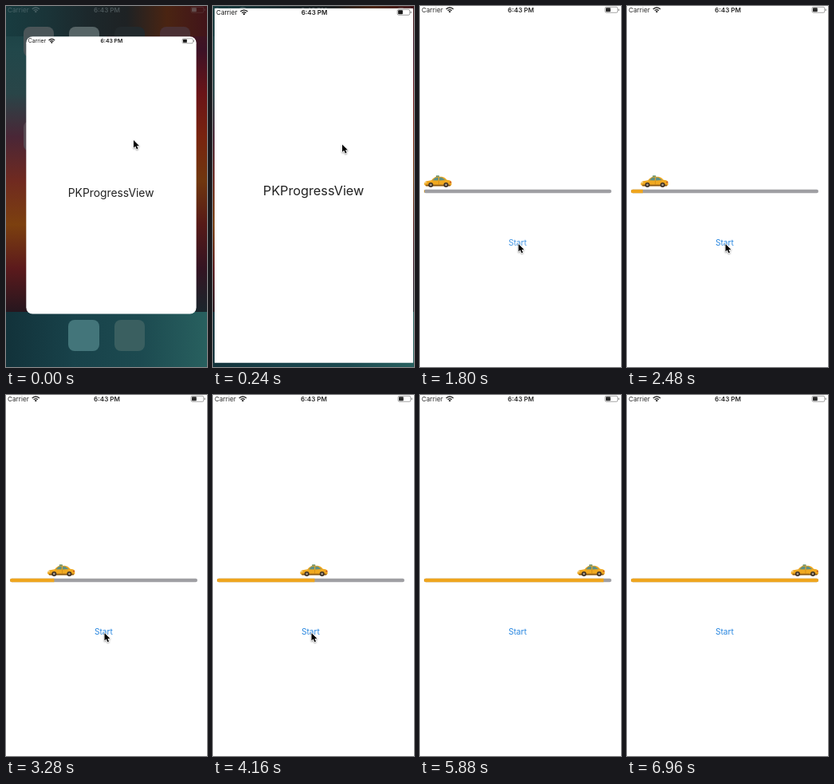
An HTML page with a canvas that plays this animation: 252 by 452 pixels, repeating every 7 s.

```html
<!DOCTYPE html>
<html lang="en">
<head>
<meta charset="utf-8">
<title>Progress view</title>
<style>
html, body { margin: 0; width: 100%; height: 100%; overflow: hidden; background: #fff; }
canvas { display: block; width: 252px; height: 452px; }
</style>
</head>
<body>
<canvas id="stage"></canvas>
<script>
const W = 252, H = 452, LOOP = 7000;
const canvas = document.getElementById('stage');
const ctx = canvas.getContext('2d');
const dpr = window.devicePixelRatio || 1;
canvas.width = W * dpr;
canvas.height = H * dpr;

const FONT = 'Inter, "Liberation Sans", sans-serif';
const clamp = v => Math.max(0, Math.min(1, v));
const lerp = (a, b, k) => a + (b - a) * k;
const span = (t, from, to) => clamp((t - from) / (to - from));

// cubic-bezier(.42, 0, .58, 1)
function easeInOut(x) {
  if (x <= 0 || x >= 1) return clamp(x);
  let lo = 0, hi = 1, s = x;
  for (let i = 0; i < 24; i++) {
    s = (lo + hi) / 2;
    const bx = 3 * (1 - s) * (1 - s) * s * 0.42 + 3 * (1 - s) * s * s * 0.58 + s * s * s;
    if (bx < x) lo = s; else hi = s;
  }
  return s * s * (3 - 2 * s);
}

function text(str, x, y, size, color, weight = 400, align = 'center') {
  ctx.font = `${weight} ${size}px ${FONT}`;
  ctx.textAlign = align;
  ctx.textBaseline = 'alphabetic';
  ctx.fillStyle = color;
  ctx.fillText(str, x, y);
}

function box(x, y, w, h, r, color) {
  ctx.beginPath();
  ctx.roundRect(x, y, w, h, r);
  ctx.fillStyle = color;
  ctx.fill();
}

function poly(points, color) {
  ctx.beginPath();
  points.forEach(([x, y]) => ctx.lineTo(x, y));
  ctx.closePath();
  ctx.fillStyle = color;
  ctx.fill();
}

function disc(x, y, r, color) {
  ctx.beginPath();
  ctx.arc(x, y, r, 0, Math.PI * 2);
  ctx.fillStyle = color;
  ctx.fill();
}

function statusBar(color) {
  text('Carrier', 2, 7.7, 8.2, color, 400, 'left');
  text('6:43 PM', 126.5, 7.7, 8.1, color, 600);

  ctx.strokeStyle = color;
  ctx.lineWidth = 1.4;
  for (const r of [3.4, 6]) {
    ctx.beginPath();
    ctx.arc(37.3, 8, r, -Math.PI * 0.77, -Math.PI * 0.23);
    ctx.stroke();
  }
  disc(37.3, 7.1, 1.2, color);

  ctx.lineWidth = 0.7;
  ctx.globalAlpha *= 0.6;
  ctx.beginPath();
  ctx.roundRect(232, 1.3, 15.8, 7, 1.7);
  ctx.stroke();
  box(248.6, 3.5, 1.1, 2.6, 0.5, color);
  ctx.globalAlpha /= 0.6;
  box(233, 2.3, 5.8, 5, 0.8, color);
}

function gradientRect(x, y, w, h, vertical, colors) {
  const g = ctx.createLinearGradient(x, y, vertical ? x : x + w, vertical ? y + h : y);
  colors.forEach((color, i) => g.addColorStop(i / (colors.length - 1), color));
  ctx.fillStyle = g;
  ctx.fillRect(x, y, w, h);
}

function homeScreen() {
  gradientRect(0, 0, 126, 383, true,
    ['#183c40', '#21474a', '#294548', '#4a2636', '#702a20', '#7c400f', '#5c1a1c', '#26161e']);
  gradientRect(126, 0, 126, 383, true,
    ['#481818', '#3c1226', '#6a1418', '#78240f', '#70370f', '#561a18', '#341422', '#1a262c']);
  gradientRect(0, 0, W, 38, false, ['#183c40', '#1a3438', '#1c282c', '#1e2224', '#4a2412', '#42141a']);
  gradientRect(0, 383, W, H - 383, false, ['#12323a', '#18424a', '#1c4a50', '#28605f']);

  ['#4a5558', '#566466', '#22292c', '#4a3034'].forEach((c, i) => box(22 + 57 * i, 26, 38, 38, 8, c));
  box(22, 144, 38, 38, 8, '#584a52');
  box(78, 393, 39, 39, 8, '#43757a');
  box(136, 393, 38, 39, 8, '#3a5f60');
  statusBar('rgba(150,165,168,.38)');
}

function launch(t) {
  const k = 1 - Math.pow(1 - span(t, 0, 420), 3);
  const x = lerp(25.5, 0, k), y = lerp(38.5, 0, k);
  const w = lerp(213, W, k), h = lerp(346.5, H, k);
  const scale = lerp(0.84, 1, k);
  box(x, y, w, h, lerp(8, 0, k), '#fff');
  ctx.save();
  ctx.translate(x + w / 2, lerp(40, 0, k));
  ctx.scale(scale, scale);
  ctx.translate(-W / 2, 0);
  statusBar('#1a1a1a');
  text('PKProgressView', 125.6, 237, 16.45, '#222');
  ctx.restore();
}

function taxi(x) {
  ctx.save();
  ctx.translate(x, 212);
  box(14.8, 0.2, 4.2, 2.2, 0.6, '#66906c');
  ctx.beginPath();
  ctx.moveTo(0, 11.6);
  ctx.quadraticCurveTo(-0.2, 8, 3, 7.2);
  ctx.lineTo(9, 6.2);
  ctx.quadraticCurveTo(12.5, 1.8, 16, 1.7);
  ctx.lineTo(22, 1.8);
  ctx.quadraticCurveTo(26, 2.2, 28.5, 5.8);
  ctx.quadraticCurveTo(33.6, 6.2, 34.2, 8);
  ctx.lineTo(34.4, 11.8);
  ctx.lineTo(33, 13.2);
  ctx.lineTo(2, 13.4);
  ctx.closePath();
  ctx.fillStyle = '#f0a920';
  ctx.fill();
  poly([[10.6, 6.2], [14, 2.8], [18, 2.6], [17.6, 6.4]], '#5f8f84');
  poly([[19, 2.6], [22.4, 2.8], [26.6, 6], [18.8, 6.4]], '#5f8f84');
  box(2, 11.8, 31, 1.6, 0.6, '#8a5a18');
  box(18, 6.4, 0.6, 5.2, 0, '#c98416');
  box(0.8, 8.2, 2.2, 1.6, 0.6, '#f4dc9c');
  box(32.2, 7.8, 1.7, 1.7, 0.5, '#c4492a');
  for (const wx of [8.3, 27.4]) {
    disc(wx, 12, 3, '#3a2e22');
    disc(wx, 12, 1.4, '#a89a88');
  }
  ctx.restore();
}

function mainScreen(t) {
  ctx.fillStyle = '#fff';
  ctx.fillRect(0, 0, W, H);
  statusBar('#2a2a2a');
  const p = easeInOut(span(t, 1600, 6600));
  box(5, 229.8, 235, 4.4, 2.2, '#9f9fa3');
  if (p > 0) {
    ctx.save();
    ctx.beginPath();
    ctx.roundRect(5, 229.8, 235, 4.4, 2.2);
    ctx.clip();
    box(5, 229, 235 * p, 6, 0, '#efa51d');
    ctx.restore();
  }
  taxi(4.6 + 201 * p);

  const alpha = ctx.globalAlpha;
  const pressed = t >= 1500 && t < 1850;
  ctx.globalAlpha = alpha * (pressed ? lerp(0.3, 1, span(t, 1600, 1850)) : 1);
  text('Start', 122.4, 299.6, 10.1, '#2484df');
  ctx.globalAlpha = alpha;
}

// time, x, y of the pointer tip
const POINTER = [[0, 160, 168], [240, 162, 173], [660, 176, 332], [760, 172, 329],
  [920, 136.5, 309], [1160, 123.5, 298], [4600, 123.5, 298], [4960, 131, 296], [5440, 131, 296]];

function pointer(t) {
  const i = POINTER.findIndex(step => step[0] > t);
  if (i < 1) return;
  const [t0, x0, y0] = POINTER[i - 1], [t1, x1, y1] = POINTER[i];
  const k = span(t, t0, t1);
  ctx.save();
  ctx.translate(lerp(x0, x1, k), lerp(y0, y1, k));
  ctx.scale(0.86, 0.86);
  ctx.beginPath();
  for (const [x, y] of [[0, 0], [0, 11], [2.6, 8.7], [4.5, 13], [6.4, 12.2], [4.6, 8], [8, 8]]) ctx.lineTo(x, y);
  ctx.closePath();
  ctx.lineJoin = 'round';
  ctx.shadowColor = 'rgba(0,0,0,.4)';
  ctx.shadowBlur = 2 * dpr;
  ctx.shadowOffsetY = dpr;
  ctx.strokeStyle = '#fff';
  ctx.lineWidth = 1.6;
  ctx.stroke();
  ctx.shadowColor = 'transparent';
  ctx.fillStyle = '#000';
  ctx.fill();
  ctx.restore();
}

function draw(t) {
  ctx.setTransform(dpr, 0, 0, dpr, 0, 0);
  ctx.globalAlpha = 1;
  if (t < 680) {
    homeScreen();
    launch(t);
  }
  const shown = span(t, 480, 680);
  if (shown > 0) {
    ctx.globalAlpha = shown;
    mainScreen(t);
    ctx.globalAlpha = 1;
  }
  pointer(t);
}

const start = performance.now();
function frame() {
  draw((performance.now() - start) % LOOP);
  requestAnimationFrame(frame);
}
frame();
</script>
</body>
</html>
```
